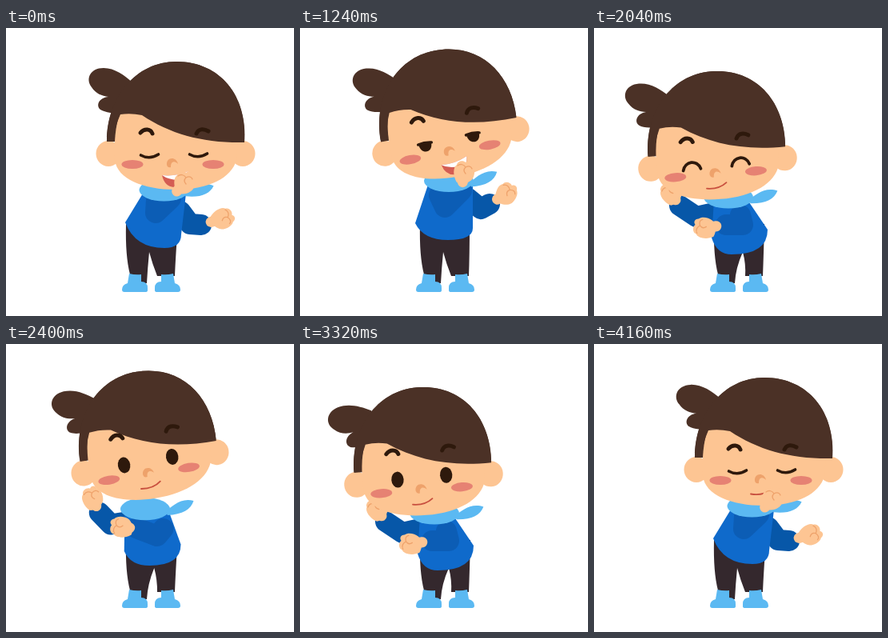
These frames come from a looping animation (360 by 360 pixels, 4.2 s). An HTML page with a canvas:

```html
<!DOCTYPE html>
<html lang="en">
<head>
<meta charset="utf-8">
<title>Dancing boy</title>
<style>
html, body { margin: 0; width: 100%; height: 100%; overflow: hidden; background: #fff; }
canvas { display: block; width: 360px; height: 360px; }
</style>
</head>
<body>
<canvas id="stage"></canvas>
<script>
const LOOP = 4200;
const SKIN = '#fdc593', CREASE = '#eea26b', HAIR = '#4b3126', DARK = '#2e190c';
const SHIRT = '#0f6acb', SLEEVE = '#0c5db5', BACK_SLEEVE = '#0757a8';
const SCARF = '#5bb9f2', PANTS = '#34282d', CHEEK = '#e68273', LIP = '#c8503f';

const canvas = document.getElementById('stage');
const ctx = canvas.getContext('2d');
const dpr = window.devicePixelRatio || 1;
canvas.width = canvas.height = 360 * dpr;

// head: x, y, tilt, brow lift; torso: neck, side, hem, side, neck
// arms: elbow, wrist, fist, fist angle
const bowRight = {
  head: [212, 157, 0, 0],
  torso: [174, 202, 149, 243, 198, 275, 219, 258, 225, 207],
  crotch: [179],
  left: [187, 231, 206, 213, 223, 193, 0],
  right: [230, 245, 244, 246, 271, 238, 60]
};
const upRight = {
  head: [188.5, 141.5, -10.5, -6],
  torso: [160, 196, 144, 244, 185, 265, 216, 250, 216, 190],
  crotch: [179],
  left: [181, 224, 202, 203, 205, 180, 0],
  right: [226, 226, 237, 220, 258, 207, 25]
};
const bowLeft = {
  head: [154.5, 169, -4.6, -4],
  torso: [150, 215, 147, 262, 172, 283, 217, 252, 190, 212],
  crotch: [186],
  left: [128, 236, 107, 222, 96, 206, -35],
  right: [186, 246, 165, 246, 138, 250, -80]
};
const upLeft = {
  head: [187, 162.5, 12, -7],
  torso: [148, 205, 148, 258, 182, 275, 219, 250, 208, 208],
  crotch: [185],
  left: [132, 222, 120, 207, 112, 188, -20],
  right: [190, 238, 163, 225, 146, 222, -90]
};

const lerp = (a, b, k) => a.map((v, i) => v + (b[i] - v) * k);
const blend = (p, q, k) =>
  Object.fromEntries(Object.keys(p).map(n => [n, lerp(p[n], q[n], k)]));
const nod = { ...blend(upRight, bowRight, 0.2), head: upLeft.head };
const rise = { ...upLeft, head: upRight.head };

const poseKeys = [
  [0, bowRight], [280, bowRight], [560, upRight], [640, upRight], [920, nod],
  [1180, upRight], [1240, upRight], [1460, bowRight], [1560, bowRight],
  [1740, bowLeft], [2240, bowLeft], [2480, rise], [2760, upLeft], [2820, upLeft],
  [3040, rise], [3300, bowLeft], [3940, bowLeft], [4160, bowRight], [4200, bowRight]
];
const swingKeys = [
  [0, 0], [640, 10], [920, -8], [1240, 4], [1740, -6], [2040, 0], [2480, -5],
  [2800, -8], [3040, 6], [3320, -17], [3600, -3], [4120, -4], [4200, 0]
];
const eyeKeys = [
  [0, 'closed'], [230, 'half'], [300, 'open'], [1180, 'half'], [1300, 'closed'],
  [1660, 'happy'], [2260, 'half'], [2340, 'open'], [2720, 'half'], [2900, 'open'],
  [3940, 'half'], [4000, 'closed']
];
// middle, half width, height
const hops = [[1640, 100, 22], [1890, 150, 6], [3600, 250, 6], [4050, 110, 24]];

function segment(keys, t) {
  let i = 0;
  while (i < keys.length - 2 && t >= keys[i + 1][0]) i++;
  const [from, a] = keys[i], [to, b] = keys[i + 1];
  return [a, b, (1 - Math.cos(Math.PI * (t - from) / (to - from))) / 2];
}

const poseAt = t => blend(...segment(poseKeys, t));
const eyesAt = t => eyeKeys.filter(k => k[0] <= t).pop()[1];

function swingAt(t) {
  const [a, b, k] = segment(swingKeys, t);
  return a + (b - a) * k;
}

function hopAt(t) {
  const hop = hops.find(([mid, half]) => Math.abs(t - mid) < half);
  return hop ? hop[2] * Math.cos((t - hop[0]) / hop[1] * Math.PI / 2) ** 2 : 0;
}

function fill(d, color) {
  ctx.fillStyle = color;
  ctx.fill(new Path2D(d));
}

function line(d, color, width) {
  ctx.strokeStyle = color;
  ctx.lineWidth = width;
  ctx.lineCap = ctx.lineJoin = 'round';
  ctx.stroke(new Path2D(d));
}

function oval(x, y, rx, ry, color) {
  ctx.beginPath();
  ctx.ellipse(x, y, rx, ry, 0, 0, 2 * Math.PI);
  ctx.fillStyle = color;
  ctx.fill();
}

function at(x, y, deg, draw) {
  ctx.save();
  ctx.translate(x, y);
  ctx.rotate(deg * Math.PI / 180);
  draw();
  ctx.restore();
}

function sleeve([sx, sy], [ex, ey, wx, wy], color) {
  line(`M${sx},${sy} L${ex},${ey} L${wx},${wy}`, color, 26);
}

function fist([, , wx, wy, x, y, deg]) {
  line(`M${wx + (x - wx) * 0.45},${wy + (y - wy) * 0.45} L${x},${y}`, SKIN, 13);
  at(x, y, deg, () => {
    fill('M-9,13 C-14,5 -14,-6 -9,-9 C-8,-14 -1,-15 2,-12 C6,-16 10,-12 10,-9 C14,-6 14,3 11,8 C7,14 -2,16 -9,13Z', SKIN);
    line('M-8,-8 C-4,-11 0,-9 2,-6 C6,-8 9,-7 10,-4 M2,-6 Q-2,-2 2,2', CREASE, 1.3);
  });
}

function legs(crotch, hip) {
  fill(`M150,245 Q149,285 155,308 L157,319 L176,319 Q177,300 ${crotch},280
    Q${crotch + 4},295 189,310 L211,310 Q212,285 ${hip},245Z`, PANTS);
  const shoe = 'M154,307 Q162,309 169,308 L169,317 Q177,317 177,325 L177,328 Q177,330 174,330 L148,330 Q145,330 145,327 Q145,321 152,319Z';
  fill(shoe, SCARF);
  ctx.save();
  ctx.translate(363, 0);
  ctx.scale(-1, 1);
  fill(shoe, SCARF);
  ctx.restore();
}

function torso([ax, ay, bx, by, x, y, cx, cy, dx, dy]) {
  fill(`M${ax},${ay} L${bx},${by} Q${bx * 0.75 + x * 0.25},${y} ${x},${y}
    Q${cx},${y} ${cx},${cy} L${dx},${dy}Z`, SHIRT);
}

function scarf(x, y, tilt) {
  oval(x - 2, y - 2, 31, 14, SCARF);
  at(x + 24, y + 1, tilt * 0.9 - 13, () =>
    fill('M0,0 C8,-3 24,-10 37,0 C30,9 18,11 0,5Z', SCARF));
}

function eye(x, y, kind) {
  at(x, y, 0, () => {
    if (kind === 'open') oval(0, 0, 7.7, 10, DARK);
    if (kind === 'closed') line('M-11,4 Q0,10 11,3', DARK, 3.6);
    if (kind === 'happy') line('M-11,8 C-8,-4 7,-5 11,7', DARK, 3.8);
    if (kind === 'half') {
      fill('M-8,-1 L8,-1 C9,12 -7,13 -8,-1Z', DARK);
      line('M-8.5,-1 Q0,-3 8.5,-1', DARK, 3.4);
    }
  });
}

function mouth(open) {
  if (!open) return line('M-16,30.5 Q-1,33 9,25', LIP, 1.8);
  fill('M-17,27 Q0,29 16,22 Q14,42 -2,42 Q-14,41 -17,27Z', '#d45d53');
  fill('M-17,27 Q0,29 16,22 Q15,29 13,32 Q-6,35 -17,27Z', '#fff');
}

function head([x, y, tilt, lift], swing, eyes, talking) {
  const dome = 'M-86,-15 C-86,-70 -50,-115 1,-115 C56,-115 90,-72 86,-14 ';
  const brows = !talking && eyes === 'open' ? lift - 5 : lift;
  at(x, y, tilt, () => {
    at(-65, -72, swing, () => fill(
      'M12,-16 C1,-26 -11,-35 -25,-35 C-42,-35 -48,-21 -40,-11 C-35,-3 -27,0 -19,1 C-31,2 -35,12 -29,17 C-23,21 -13,21 5,24Z', HAIR));
    fill(dome + 'Z', HAIR);
    for (const side of [-84, 84]) oval(side, 0, 15.5, 16, SKIN);
    fill('M-69,-52 C-76,-35 -77,-10 -76,8 C-73,32 -40,45 0,45 C42,45 70,30 76,8 L78,-16 L-30,-55Z', SKIN);
    fill(dome + 'C35,-13 -6,-24 -42,-48 Q-56,-51 -69,-49 Q-76,-34 -78,-15Z', HAIR);

    at(0, brows, 0, () =>
      line('M-44,-26 C-39,-32 -31,-31 -29,-25 M26,-25 C29,-32 36,-31 41,-28', DARK, 5));
    eye(-32.5, -2, eyes);
    eye(28.5, -3, eyes);
    for (const cheek of [-54, 47]) oval(cheek, 13.5, 13.5, 5.6, CHEEK);
    fill('M-11,14 C-12,4 1,3 3,13 C-1,9 -6,9 -6,17 Q-10,18 -11,14Z', CREASE);
    mouth(talking);
  });
}

function draw(t) {
  const pose = poseAt(t);
  const [ax, ay, , , , , hip, , bx, by] = pose.torso;
  const leftArm = [[ax + 14, ay + 13], pose.left];
  const rightArm = [[bx - 7, by + 22], pose.right];
  const swapped = t >= 1640 && t < 4050;
  const [front, back] = swapped ? [rightArm, leftArm] : [leftArm, rightArm];
  pose.head[1] -= hopAt(t);

  ctx.setTransform(dpr, 0, 0, dpr, 0, 0);
  ctx.fillStyle = '#fff';
  ctx.fillRect(0, 0, 360, 360);
  sleeve(...back, BACK_SLEEVE);
  fist(back[1]);
  legs(pose.crotch[0], hip - 4);
  torso(pose.torso);
  sleeve(...front, SLEEVE);
  scarf((ax + bx) / 2, (ay + by) / 2, pose.head[2]);
  head(pose.head, swingAt(t), eyesAt(t), t < 1640);
  fist(front[1]);
}

const start = performance.now();
function tick() {
  const t = (performance.now() - start) % LOOP;
  draw(Math.floor(t / 40) * 40);
  requestAnimationFrame(tick);
}
tick();
</script>
</body>
</html>
```
